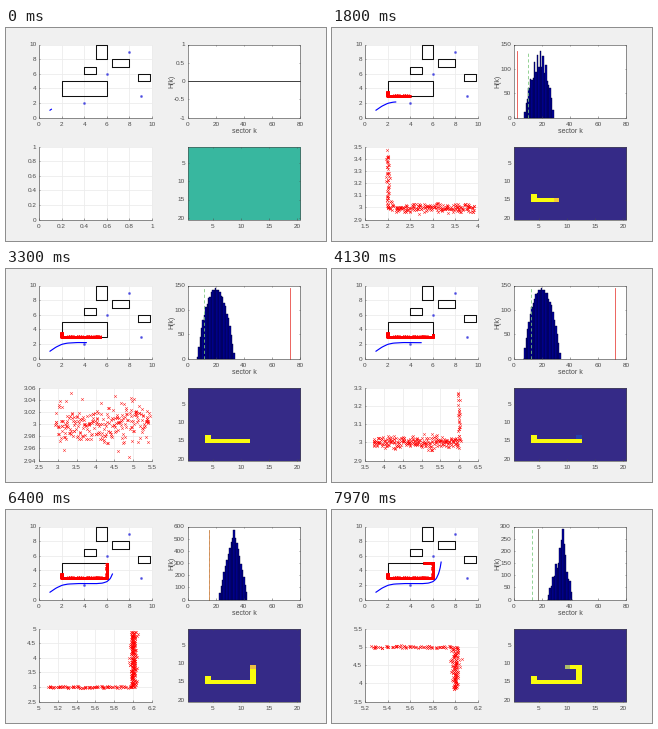
Recreate the animation shown at these times as a matplotlib script. Size 320 by 213 pixels, loop 8 s.

```python
import math
import numpy as np
import matplotlib.pyplot as plt
from matplotlib.animation import FuncAnimation
from matplotlib.collections import LineCollection, PolyCollection
from matplotlib.colors import LinearSegmentedColormap
from matplotlib.patches import Rectangle

W, H, DPI = 320, 213, 100
FRAMES, STEP_MS = 200, 40
PX = 72 / DPI
INK, GRID = "#4a4a4a", "#ececec"
RANGE, CAP = 1.5, 60

plt.rcParams["font.family"] = "Liberation Sans"
fig = plt.figure(figsize=(W / DPI, H / DPI), dpi=DPI, facecolor="#f0f0f0")
ax = fig.add_axes([0, 0, 1, 1])
ax.axis("off")

PARULA = LinearSegmentedColormap.from_list("parula", [
    "#352a87", "#0f5cdd", "#127dd8", "#079ccf", "#15b1b4",
    "#59bd8c", "#a5be6b", "#e1b952", "#fcce2e", "#f9fb0e"])


class Panel:
    """A plot area placed in pixels, either boxed or open with a faint grid."""

    def __init__(self, left, top, right, bottom, boxed):
        self.area = left, top, right, bottom
        self.boxed = boxed
        ax.add_patch(Rectangle((left, top), right - left, bottom - top,
                               fc="white", ec="none", zorder=0))
        frame = [(left, top), (left, bottom), (right, bottom)]
        if boxed:
            frame += [(right, top), (left, top)]
        ax.plot(*zip(*frame), color=INK, lw=0.6 * PX, zorder=6)
        self.marks = [LineCollection([], colors=INK, linewidths=0.5 * PX, zorder=6)
                      for _ in "xy"]
        self.grid = [LineCollection([], colors=GRID, linewidths=0.8 * PX, zorder=0.5)
                     for _ in "xy"]
        for lines in self.marks + self.grid:
            ax.add_collection(lines)
        style = dict(fontsize=6.4 * PX, color=INK)
        self.labels = [
            [ax.text(0, 0, "", ha="center", va="center", **style) for _ in range(9)],
            [ax.text(0, 0, "", ha="right", va="center", **style) for _ in range(9)]]

    def limits(self, x, y):
        self.lim = x, y

    def to_px(self, x, y):
        left, top, right, bottom = self.area
        (x0, x1), (y0, y1) = self.lim
        return (left + (np.asarray(x) - x0) / (x1 - x0) * (right - left),
                bottom - (np.asarray(y) - y0) / (y1 - y0) * (bottom - top))

    def ticks(self, axis, values):
        left, top, right, bottom = self.area
        near, far, full = [], [], []
        for i, label in enumerate(self.labels[axis]):
            if i >= len(values):
                label.set_text("")
                continue
            v = round(float(values[i]), 6) + 0.0
            label.set_text(f"{v:g}")
            if axis == 0:
                x = float(self.to_px(v, self.lim[1][0])[0])
                label.set_position((x, bottom + 7))
                near.append([(x, bottom), (x, bottom - 1.3)])
                far.append([(x, top), (x, top + 1.3)])
                full.append([(x, top), (x, bottom)])
            else:
                y = float(self.to_px(self.lim[0][0], v)[1])
                label.set_position((left - 2.7, y + 0.4))
                near.append([(left, y), (left + 1.3, y)])
                far.append([(right, y), (right - 1.3, y)])
                full.append([(left, y), (right, y)])
        self.marks[axis].set_segments(near + far if self.boxed else near)
        if not self.boxed:
            self.grid[axis].set_segments(full)


def nice(lo, hi, most):
    """Round limits outwards to a 1-2-5 step; return limits and ticks."""
    span = max(hi - lo, 0.02)
    base = 10 ** math.floor(math.log10(span / most))
    step = next(m * base for m in (1, 2, 5, 10) if span <= most * m * base * 1.000001)
    a = math.floor(lo / step + 1e-6)
    b = max(math.ceil(hi / step - 1e-6), a + 1)
    return (a * step, b * step), np.arange(a, b + 1) * step


# --- vehicle motion -------------------------------------------------------
WAY = np.array([
    (-0.3, 0.85, 0.88), (0, 1.1, 1.15), (0.55, 1.5, 1.57), (1.13, 2.02, 1.96),
    (1.6, 2.5, 2.12), (2.43, 3.4, 2.2), (4.13, 4.97, 2.18), (4.7, 5.57, 2.24),
    (5.2, 6.0, 2.44), (5.75, 6.3, 2.85), (6.4, 6.5, 3.5), (7.1, 6.64, 4.25),
    (7.97, 6.74, 5.15), (8.3, 6.76, 5.5)])


def position(t):
    shifts = np.linspace(-0.12, 0.12, 7)
    return [np.mean([np.interp(t + d, WAY[:, 0], WAY[:, c]) for d in shifts], axis=0)
            for c in (1, 2)]


# --- sensed wall: outline of the large block ------------------------------
def side(p, q):
    return np.linspace(p, q, round(math.dist(p, q) / 0.01), endpoint=False)


wall = np.concatenate([side((2, 5), (2, 3)), side((2, 3), (6, 3)),
                       side((6, 3), (6, 5)), side((6, 5), (2, 5))])


def jitter(seed):
    noise = np.random.default_rng(seed).normal(0, 0.018, wall.shape)
    return wall + np.clip(noise, -0.054, 0.054)


def simulate():
    states = []
    seen = np.zeros(len(wall), bool)
    grid = np.zeros((20, 20))
    for i in range(FRAMES):
        x, y = position(i * STEP_MS / 1000)
        near = np.hypot(wall[:, 0] - x, wall[:, 1] - y) < RANGE
        scan = jitter(i)[near]
        seen = seen | near
        col, row = np.round(scan * 2).astype(int).T
        np.add.at(grid, (20 - row, col - 1), 1)
        grid = np.minimum(grid, CAP)
        states.append((scan, seen, grid.copy()))
    return states


STATES = simulate()
CLOUD = jitter(999)

# --- sector histogram: t, low, mode, high, peak, power, rough, heading, goal
KEYS = np.array([
    (0.5, 10, 15, 18, 20, 1, 0.3, 7, 9),
    (1.13, 8, 18, 24, 130, 1.3, 0.45, 4.3, 10),
    (2.43, 6.7, 20, 33.5, 143, 2.1, 0.04, 1, 11),
    (4.13, 7, 20, 33.5, 146, 2.1, 0.04, 0.5, 12.5),
    (5.2, 14, 22, 37, 420, 0.8, 0.5, 8, 15.5),
    (6.4, 22, 33, 43, 575, 1.1, 0.05, 15, 15.2),
    (7.97, 24, 35, 42, 290, 0.9, 0.3, 17, 13)])
K = np.arange(1, 73)


def histogram(t):
    lo, mode, hi, peak, power, rough, head, goal = (
        np.interp(t, KEYS[:, 0], c) for c in KEYS.T[1:])
    u = np.abs(K - mode) / np.where(K < mode, mode - lo, hi - mode)
    h = np.clip(1 - np.minimum(u, 1) ** power, 0, 1)
    d = np.abs(K - round(float(mode)))
    wave = 0.5 + 0.5 * np.sin(2.4 * d + 1.5 * np.sin(t * 2.5 + 0.7 * d))
    h = h * np.where(d == 0, 1, 1 - rough * wave)
    return h / h.max() * peak, peak, head + 72 * (head < 1.5), goal


def heading_color(t):
    stops = (1.7, "#e2968e"), (5.8, "#e8423c"), (7.2, "#d9824a"), (9, "#6a5a54")
    return next(c for end, c in stops if t < end)


# --- fixed parts ----------------------------------------------------------
LEFT, RIGHT = (33, 146), (181.7, 294)
UPPER, LOWER = (16.6, 89.6), (118.7, 191.6)


def panel(cols, rows, boxed):
    return Panel(cols[0], rows[0], cols[1], rows[1], boxed)


world = panel(LEFT, UPPER, False)
hist = panel(RIGHT, UPPER, True)
zoom = panel(LEFT, LOWER, False)
cells = panel(RIGHT, LOWER, True)

world.limits((0, 10), (0, 10))
cells.limits((0.5, 20.5), (20.5, 0.5))
for a in (0, 1):
    world.ticks(a, range(0, 11, 2))
    cells.ticks(a, range(5, 21, 5))
hist.limits((0, 80), (-1, 1))
hist.ticks(0, range(0, 81, 20))

for x, y, w, h in [(2, 3, 4, 2), (4, 6, 1, 1), (5, 8, 1, 2),
                   (6.5, 7, 1.5, 1), (8.8, 5, 1, 1)]:
    px, py = world.to_px([x, x + w, x + w, x, x], [y, y, y + h, y + h, y])
    ax.plot(px, py, color="#101010", lw=1.05 * PX, zorder=3)

ax.plot(*world.to_px([4, 6, 9, 8], [2, 6, 3, 9]), ls="", marker=(6, 2, 0),
        ms=2.8 * PX, mec="#4a4ae0", mew=0.4 * PX, zorder=3)
ax.text(238, 103.2, "sector k", ha="center", va="center", fontsize=7 * PX, color=INK)
ax.text(165.5, 53, "H(k)", ha="center", va="center", rotation=90,
        fontsize=7 * PX, color=INK)

# --- moving parts ---------------------------------------------------------
trail, = ax.plot([], [], color="#0000ff", lw=1.15 * PX, zorder=5)
cross = dict(ls="", marker="x", color="#ff0000")
hits, = ax.plot([], [], ms=2.3 * PX, mew=0.6 * PX, zorder=4, **cross)
scan_dots, = ax.plot([], [], ms=2.8 * PX, mew=0.5 * PX, alpha=0.8, zorder=4, **cross)
bars = PolyCollection([], facecolors="#0000a0", edgecolors="#000030",
                      linewidths=0.4 * PX, zorder=3)
ax.add_collection(bars)
flat, = ax.plot([], [], color="#303030", lw=0.9 * PX, zorder=3)
goal_line, = ax.plot([], [], color="#7cc87c", lw=0.8 * PX, ls=(0, (4, 3)), zorder=4)
head_line, = ax.plot([], [], lw=0.8 * PX, zorder=4)
image = ax.imshow(np.zeros((20, 20)), cmap=PARULA, vmin=0, vmax=1, aspect="auto",
                  interpolation="nearest", extent=(*RIGHT, *LOWER[::-1]), zorder=1)
ax.set_xlim(0, W)
ax.set_ylim(H, 0)


def draw_empty():
    zoom.limits((0, 1), (0, 1))
    for a in (0, 1):
        zoom.ticks(a, np.linspace(0, 1, 6))
    hist.limits((0, 80), (-1, 1))
    hist.ticks(1, np.linspace(-1, 1, 5))
    flat.set_data(*hist.to_px([0, 80], [0, 0]))
    bars.set_verts([])
    for line in (scan_dots, goal_line, head_line):
        line.set_data([], [])
    image.set_data(np.full((20, 20), 0.5))


def draw_scan(t, scan, grid):
    (xl, xt), (yl, yt) = (nice(c.min(), c.max(), 5.6) for c in scan.T)
    zoom.limits(xl, yl)
    zoom.ticks(0, xt)
    zoom.ticks(1, yt)
    scan_dots.set_data(*zoom.to_px(*scan.T))

    h, peak, head, goal = histogram(t)
    yl, yt = nice(0, peak, 6)
    hist.limits((0, 80), yl)
    hist.ticks(1, yt)
    on = h > 0
    x0, top = hist.to_px(K[on] - 0.5, h[on])
    x1, base = hist.to_px(K[on] + 0.5, 0 * h[on])
    bars.set_verts(np.stack([np.stack(p, -1) for p in
                             ((x0, base), (x0, top), (x1, top), (x1, base))], 1))
    flat.set_data([], [])
    goal_line.set_data(*hist.to_px([goal, goal], [0, peak]))
    head_line.set_data(*hist.to_px([head, head], [0, peak]))
    head_line.set_color(heading_color(t))
    image.set_data(grid / grid.max())


def update(i):
    t = i * STEP_MS / 1000
    scan, seen, grid = STATES[i]
    trail.set_data(*world.to_px(*position(np.linspace(-0.15, t, 12 + i))))
    hits.set_data(*world.to_px(*CLOUD[seen].T))
    if len(scan):
        draw_scan(t, scan, grid)
    else:
        draw_empty()
    return []


anim = FuncAnimation(fig, update, frames=FRAMES, interval=STEP_MS,
                     init_func=lambda: update(0), repeat=True, repeat_delay=0)
plt.show()
```
